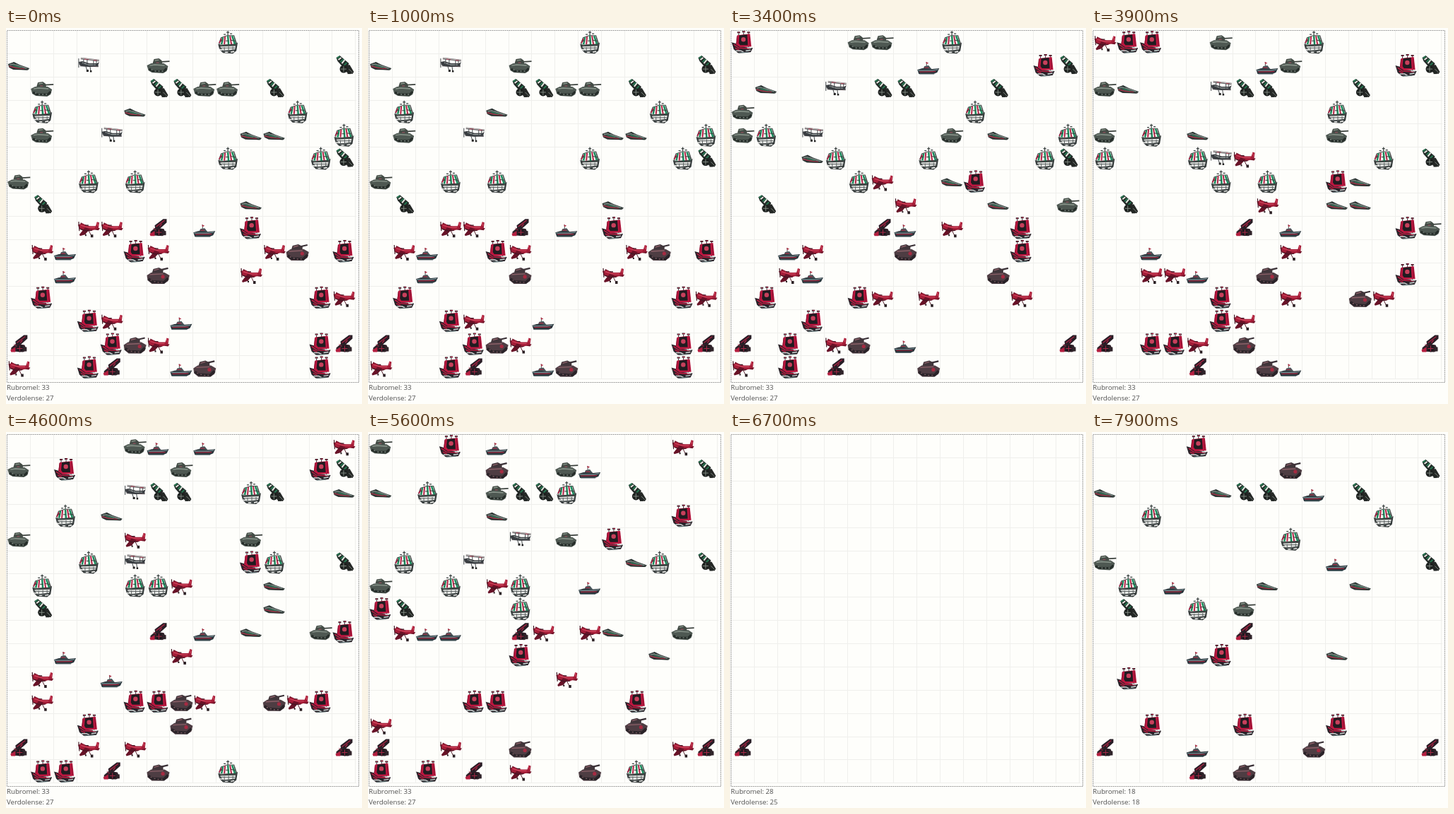
These frames come from a looping animation (504x532 px, 8 s). An HTML page with a canvas:

```html
<!DOCTYPE html>
<html lang="pt">
<head>
<meta charset="utf-8">
<title>Batalha no tabuleiro</title>
<style>
  html, body { margin: 0; width: 100%; height: 100%; overflow: hidden; background: #fefefb; }
  canvas { position: absolute; left: 0; top: 0; }
  p { position: absolute; left: 1px; margin: 0; font: 9.7px/14px "Open Sans", "Noto Sans", sans-serif; color: #505050; white-space: nowrap; }
  #red { top: 501.5px; }
  #green { top: 516.5px; }
</style>
</head>
<body>
<canvas id="board" width="504" height="532"></canvas>
<p id="red"></p>
<p id="green"></p>
<script>
const ctx = document.getElementById('board').getContext('2d');
const LOOP = 8000, SIZE = 15, CELL = 32.87, LEFT = 1.3, TOP = 3.2;

// Start of each turn, and the turns whose layout is given below.
const TURNS = [0, 2900, 3400, 3800, 4300, 4800, 5200, 5800, 6200, 6700, 7100, 7500];
const KEY_TURNS = [0, 2, 4, 6, 11];
const REDRAW = { from: 6700, to: 6800 };
const LOSSES = { 7: [31, 27], 8: [30, 26], 9: [28, 25], 10: [22, 21], 11: [18, 18] };

// Upper case: red side, lower case: green side.
// s ship, b boat, p plane, t tank, c cannon
const LAYOUTS = [`
  .........s b..p..t.......c .t....cctt.c .s...b......s .t..p.....bb..s
  .........s...sc t..s.s .c........b ...PP.C.B.S .PB..SP....PT.S
  ..B...T...P .S...........SP ...SP..B C...STP......SC P..SC..BT....S`, `
  S....tt..s ........B....Sc .b..p.cc...c t.........s ts.p.....t.b..s
  ...bs...s....sc .....sP..bS .c.....P...b..t ......CB.P..S ..BP...T....S
  ..PB.......T .S...SP.P...P ...S C.S.PT.B......C P.S.C...T`, `
  .....tB.B.....P t.S....t.....Sc .....pcc..sc..b ..s.b t....P....t
  ...s.p....Ss..c .s...ssP...b .c.........b ......C.B.b..tS ..B....P
  .P..B .P...SSTP..TPS ...S...T C..P.P........C .SS.C.T..s`, `
  t..S.B.......P .....T..tB....c b.s..tccs..c .....b.......S ......p.t.S
  .s..p......bs.c t..s.Ps..B Sc....s .PBB..CP.Pb..t ......S.....b
  ........P ....SS.....S P..........T C..P..T......PC S.S.C.P..T.s`, `
  ....S ........T.....c b....bcc.B.c ..s.........s ........s
  t.........B...c .s.B...b...b .c..s.t ......C ....BS....b
  .S . ..S...S...S C...B....T....C ....C.T`
].map(text => text.trim().split(/\s+/).flatMap((row, y) =>
  [...row].flatMap((kind, x) => kind === '.' ? [] : [{ kind, x, y }])));

// Each sprite is a list of [colour, path, line width]; no width means filled.
const SPRITES = {
  s: [
    ['#343a3a', 'M3 19L8 22 28 20 31 17 29 29 24 33 10 32 5 27Z'],
    ['#e9ebe8', 'M6 23L28 22 27 27 10 29Z'],
    ['#5b6060', 'M5 25L27 25M9 29L26 29M12 24V31M18 23V32M24 23V31', 1],
    ['#3a4140', 'M17 1V9M15 3H19M20 5H23M11 6H14', 1.2],
    ['#454b49', 'M7 10L16 7 26 7 30 19 28 22 6 22 4 18Z'],
    ['#f2f2ee', 'M8 11L16 8 25 8 28 19 7 21 5 18Z'],
    ['#16895a', 'M10 10L8 20M17 8L18 21M23 8L27 20', 2.4],
    ['#b51d43', 'M13 9L12 20M20 8L22 20M8 12L5 18', 1.9],
    ['#343b39', 'M6 15H10M14 15H18M21 14L27 15M7 21L28 20', 1],
    ['#fafaf7', 'M5 27L9 28M13 31H17M21 31L26 30', 1.4]
  ],
  S: [
    ['#282127', 'M9 2H13V4H9ZM16 1H20V3H16ZM23 2H27V4H23Z'],
    ['#c41b42', 'M10 3H12M17 2H20M24 3H26', 1],
    ['#373137', 'M11 4V20M18 3V20M25 4V24', 1],
    ['#292329', 'M1 17L8 19 13 23 31 25 28 31 10 32 4 27Z'],
    ['#bd1740', 'M9 7L27 5 29 23 13 24 7 20Z'],
    ['#211b20', 'M12 7L23 6 24 21 13 21 11 18Z'],
    ['#8e1230', 'M9 8L8 19M26 7L27 22', 1.2],
    ['#c8405c', 'M14.5 13a3.2 3.2 0 1 0 6.4 0a3.2 3.2 0 1 0 -6.4 0'],
    ['#b31c3f', 'M4 20L11 25 27 26M6 25L12 28', 1.6],
    ['#cdd5d4', 'M7 29L14 29 18 31M21 29L28 28M23 25H29', 1.5],
    ['#5d7173', 'M11 32L25 31', 1.2]
  ],
  b: [
    ['#3b4442', 'M1.5 15L7 13 10 12 14 14 18 16 32 21 30 23.5 9 23 3 20Z'],
    ['#7f8f89', 'M4 16L10 15 19 18 28 21', 1.3],
    ['#9f3447', 'M3 18L11 20 25 22', 1.5],
    ['#2f7d5b', 'M9 17L20 20', 1.2],
    ['#222827', 'M9 13L13 15M5 20L12 22 29 23', 1.1]
  ],
  B: [
    ['#403c40', 'M14 12V20', 0.9],
    ['#b02a3f', 'M13 12L17 13.5 14 15Z'],
    ['#48565a', 'M9 22L11 18 17 17 21 22Z'],
    ['#29343a', 'M1 23L8 21 22 22 32 21 29 27 24 29 3 29Z'],
    ['#7d9297', 'M2 24L22 24 30 22.5', 1.2],
    ['#a12840', 'M4 26L27 25.5M11 20H17', 1.2],
    ['#5f7277', 'M4 29L25 29', 1]
  ],
  p: [
    ['#666366', 'M6 7L32 10M5 17L31 18', 2.6],
    ['#d9d4d2', 'M6 6.6L32 9.6', 0.9],
    ['#a5485a', 'M11 8L17 8.5M24 9.5L29 10M22 17.7H28', 1.2],
    ['#383c40', 'M3 12L8 11 18 14 29 14 32 12 30 18 18 19 8 18 4 16Z'],
    ['#b8c0bd', 'M8 13L17 16 27 16', 1],
    ['#41464a', 'M3 7V20M10 8V17M15 8V17M24 10V18M28 10V18M13 18L15 24M19 18L20 25', 1],
    ['#222', 'M14 23h3v3h-3ZM19 24h2.5v2.5h-2.5Z']
  ],
  P: [
    ['#74152a', 'M6 9L16 14 33 17 31 20 17 18 5 12Z'],
    ['#a51d38', 'M2 12L8 11 18 14 27 14 29 8 32 9 31 17 20 21 10 21 4 18Z'],
    ['#681227', 'M12 16L19 18 12 26 5 28 4 26Z'],
    ['#d44c62', 'M6 13L17 16 26 16M29 9L30 14', 1.1],
    ['#401724', 'M3 8L4 21M5 18L13 21 22 20M12 13L17 13', 1.2],
    ['#55202d', 'M17 20L21 28M12 21L13 27', 1],
    ['#2b2024', 'M20 26h3.5v4h-3.5ZM12 26h2v2h-2Z']
  ],
  t: [
    ['#3a403c', 'M17 12L33 11', 1.8],
    ['#434b45', 'M9 14L11 8 18 7 22 10 23 15Z'],
    ['#4e5852', 'M1 17L7 14 25 14 31 18 29 25 24 28 8 27 3 24Z'],
    ['#8a968c', 'M5 17L12 16 26 17M12 10L18 9', 1.4],
    ['#252c29', 'M4 22L10 25 25 25 29 21', 3],
    ['#7a847d', 'M7 23h2M12 25h2M17 25h2M22 25h2', 1.4],
    ['#86505a', 'M14 13H18', 1.4]
  ],
  T: [
    ['#393036', 'M18 11L31 8', 2.2],
    ['#40353a', 'M8 15L10 9 18 7 24 10 24 16Z'],
    ['#4e3d43', 'M1 18L7 14 26 14 33 18 31 26 25 30 8 30 2 25Z'],
    ['#8b6068', 'M5 17L24 16M11 11L18 9', 1.4],
    ['#292328', 'M3 23L9 27 25 28 31 22', 3.6],
    ['#7d5b61', 'M6 25h2M11 27h2M16 28h2M21 28h2', 1.4],
    ['#a52b42', 'M21 20a2.6 2.6 0 1 0 5.2 0a2.6 2.6 0 1 0 -5.2 0']
  ],
  c: [
    ['#232a27', 'M6 6L11 3 24 14 22 21 17 21 8 11Z'],
    ['#e2e9e0', 'M9 9L13 6M14 14L18 9', 2],
    ['#267b53', 'M7 7L11 4M12 12L16 8M17 17L21 13', 1.8],
    ['#252826', 'M18 18L25 16 31 26 29 29 21 27Z'],
    ['#1d211f', 'M11 22a5.5 5.5 0 1 0 11 0a5.5 5.5 0 1 0 -11 0'],
    ['#87918a', 'M16.5 18V26M12.5 22H20.5M24 22L29 27', 0.9],
    ['#222624', 'M22 25h5v4h-5Z']
  ],
  C: [
    ['#281d25', 'M12 13L24 4 29 4 29 9 19 18 13 19Z'],
    ['#9c2440', 'M14 15L26 6M19 15L22 11', 1.5],
    ['#302129', 'M6 22L13 16 25 18 28 25 23 28 6 27Z'],
    ['#b41f40', 'M5 25L12 21 12 28 6 28Z'],
    ['#21191f', 'M13 23a5 5 0 1 0 10 0a5 5 0 1 0 -10 0'],
    ['#a62a47', 'M18 19V27M14 23H22M10 17L14 20', 1],
    ['#30242a', 'M23 21h5v6h-5Z']
  ]
};
for (const parts of Object.values(SPRITES))
  for (const part of parts) part[1] = new Path2D(part[1]);

const wrap = n => (n + SIZE) % SIZE;
const shortest = (a, b) => wrap(b - a + 7) - 7;
const isRed = piece => piece.kind < 'a';

// Pairs every piece with its nearest successor; pieces without one come last.
function planMoves(from, to) {
  const left = [...from];
  const moves = to.map(goal => {
    let best = null;
    for (const piece of left) {
      if (piece.kind !== goal.kind) continue;
      const dx = shortest(piece.x, goal.x), dy = shortest(piece.y, goal.y);
      const distance = Math.hypot(dx, dy);
      if (!best || distance < best.distance) best = { piece, dx, dy, distance };
    }
    left.splice(left.indexOf(best.piece), 1);
    return { ...best.piece, dx: best.dx, dy: best.dy };
  });
  return [...moves, ...left.map(piece => ({ ...piece, dx: 0, dy: 0 }))];
}
const PLANS = LAYOUTS.slice(1).map((layout, i) => planMoves(LAYOUTS[i], layout));

const countsAt = turn => LOSSES[turn] || [33, 27];

function piecesAt(turn) {
  const exact = KEY_TURNS.indexOf(turn);
  if (exact >= 0) return LAYOUTS[exact];
  const next = KEY_TURNS.findIndex(key => key > turn);
  const start = KEY_TURNS[next - 1];
  const part = (turn - start) / (KEY_TURNS[next] - start);
  const plan = PLANS[next - 1];
  const [red, green] = countsAt(turn);
  const alive = [
    ...plan.filter(isRed).slice(0, red),
    ...plan.filter(piece => !isRed(piece)).slice(0, green)
  ].sort((a, b) => /c/i.test(b.kind) - /c/i.test(a.kind));
  const taken = new Set();
  return alive.map(({ kind, x, y, dx, dy }) => {
    x = wrap(x + Math.round(dx * part));
    y = wrap(y + Math.round(dy * part));
    while (taken.has(y * SIZE + x)) x = wrap(x + 1);
    taken.add(y * SIZE + x);
    return { kind, x, y };
  });
}

function line(x1, y1, x2, y2) {
  ctx.beginPath();
  ctx.moveTo(x1, y1);
  ctx.lineTo(x2, y2);
  ctx.stroke();
}

function drawGrid() {
  ctx.fillStyle = '#fefefb';
  ctx.fillRect(0, 0, 504, 532);
  ctx.lineWidth = 1;
  ctx.strokeStyle = '#efefec';
  for (let i = 1; i <= SIZE; i++) {
    const x = Math.round(LEFT + i * CELL) + 0.5, y = Math.round(TOP + i * CELL) + 0.5;
    line(x, 3, x, 497);
    line(1, y, 496, y);
  }
  ctx.strokeStyle = '#999';
  ctx.setLineDash([2, 1]);
  ctx.strokeRect(1.5, 3.5, 498, 498);
  ctx.setLineDash([]);
}

function drawPiece({ kind, x, y }) {
  ctx.save();
  ctx.translate(LEFT + x * CELL, TOP + y * CELL);
  for (const [colour, path, width] of SPRITES[kind]) {
    ctx.fillStyle = ctx.strokeStyle = colour;
    ctx.lineWidth = width || 1;
    if (width) ctx.stroke(path); else ctx.fill(path);
  }
  ctx.restore();
}

let shown = '';
function render() {
  const time = performance.now() % LOOP;
  const turn = TURNS.findLastIndex(start => start <= time);
  const redrawing = time >= REDRAW.from && time < REDRAW.to;
  const state = turn + '/' + redrawing;
  if (state !== shown) {
    shown = state;
    drawGrid();
    if (redrawing) drawPiece({ kind: 'C', x: 0, y: 13 });
    else piecesAt(turn).forEach(drawPiece);
    const [red, green] = countsAt(turn);
    document.getElementById('red').textContent = 'Rubromel: ' + red;
    document.getElementById('green').textContent = 'Verdolense: ' + green;
  }
  requestAnimationFrame(render);
}
render();
</script>
</body>
</html>
```
